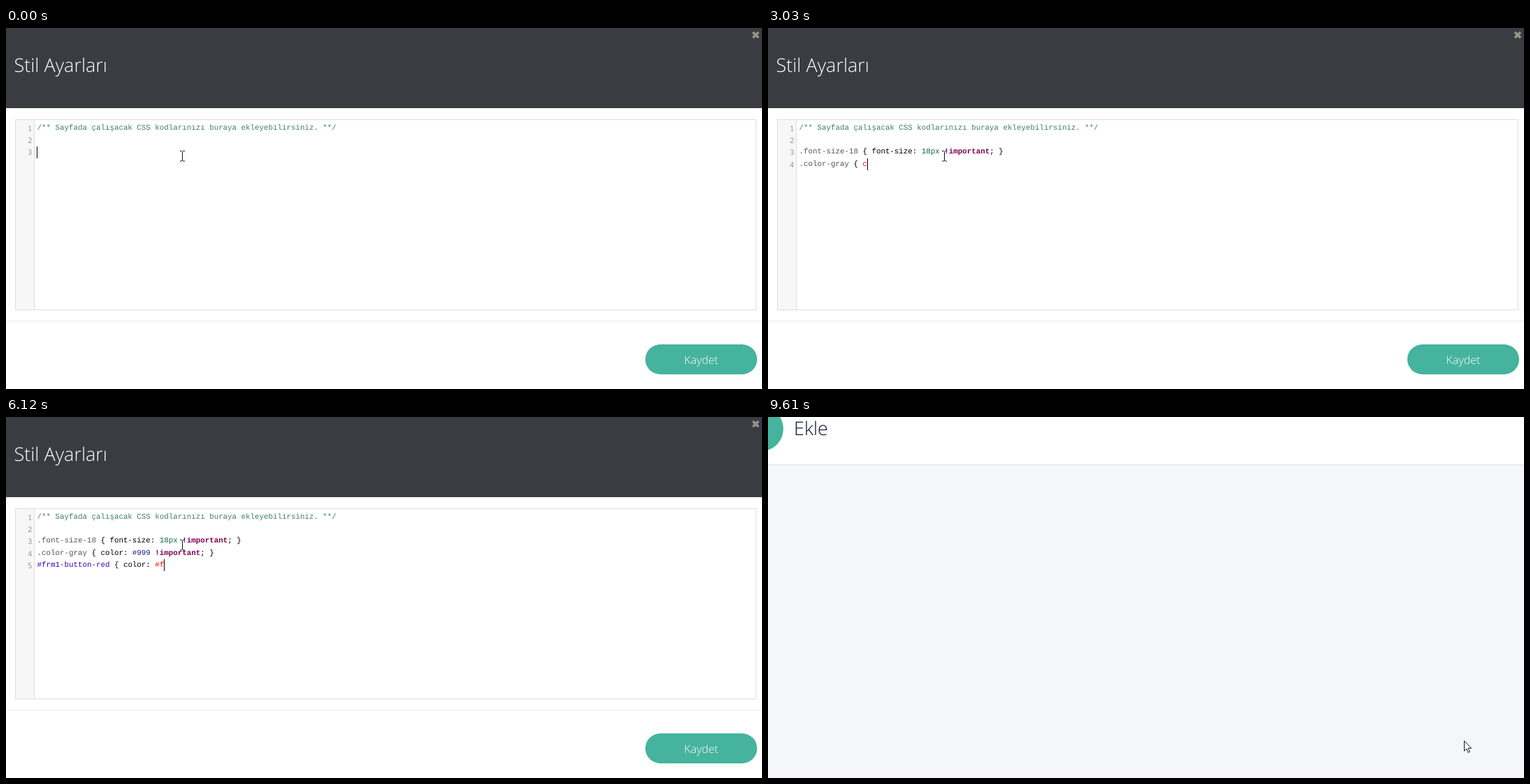
Recreate the animation shown at these times as an HTML page. Size 1082x518 px, loop 9760 ms.

```html
<!DOCTYPE html>
<html lang="tr">
<head>
<meta charset="utf-8">
<title>Stil Ayarları</title>
<style>
  html, body { margin: 0; width: 100%; height: 100%; overflow: hidden; background: #fff; }
  body { position: relative; font-family: "Open Sans", "Noto Sans", sans-serif; font-weight: 300;
    text-rendering: geometricPrecision; }
  #stage { position: absolute; left: 0; top: 0; width: 1082px; height: 518px; overflow: hidden; }
  #stage div, #stage svg, pre, #caret { position: absolute; box-sizing: border-box; margin: 0; white-space: pre; }
  [hidden] { display: none !important; }

  .page { inset: 0; background: #fff; }
  .head { left: 0; top: 0; width: 1082px; height: 115px; background: #3a3c42; }
  .title { font-size: 27px; line-height: 36px; }
  .head .title { left: 11.5px; top: 35px; color: #fff; }
  .editor { left: 13px; top: 131px; width: 1061px; height: 274px; border: 1px solid #ddd; }
  .gutter { left: 0; top: 0; width: 27px; height: 272px; background: #f7f7f7; border-right: 1px solid #ddd; }
  .rule { left: 0; top: 420px; width: 1082px; height: 1px; background: #e9e9e9; }
  #save { left: 915px; top: 453.5px; width: 160px; height: 43.5px; border-radius: 22px;
    color: #fff; font-size: 16px; line-height: 44px; text-align: center; }

  .mono { font: 10.82px/17.25px "Noto Sans Mono", "DejaVu Sans Mono", monospace; top: 135.8px; }
  #nums { left: 14px; width: 23.5px; text-align: right; color: #999; }
  #code { left: 44.6px; color: #000; }
  #caret { width: 1px; height: 17px; background: #000; }
  .comment { color: #3f7f5f; }
  .keyword { color: #7f0055; font-weight: 700; }
  .qualifier { color: #555; }
  .builtin { color: #30a; }
  .atom { color: #219; }
  .number { color: #164; }
  .error { color: #f00; }

  #next { background: #f4f6fa; }
  .bar { left: 0; top: 0; width: 1082px; height: 69px; background: #fff; border-bottom: 1px solid #dcdfe0; }
  .dot { left: -42px; top: -15px; width: 64px; height: 64px; border-radius: 50%; background: #45b39d; }
  .bar .title { left: 37px; top: -2px; color: #0c1733; }
</style>
</head>
<body>
<div id="stage">
  <div class="page" id="form">
    <div class="head">
      <div class="title">Stil Ayarları</div>
      <svg style="left:1067px;top:4px" width="12" height="12">
        <path d="M2 2L10 10M10 2L2 10" stroke="#96948a" stroke-width="3.6"/>
      </svg>
    </div>
    <div class="editor"><div class="gutter"></div></div>
    <pre class="mono" id="nums"></pre>
    <div class="mono" id="code"><pre id="text"></pre><span id="caret"></span></div>
    <div class="rule"></div>
    <div id="save">Kaydet</div>
  </div>
  <div class="page" id="next">
    <div class="bar"><div class="dot"></div><div class="title">Ekle</div></div>
  </div>
  <svg id="beam" width="9" height="16">
    <path d="M1 .5H3.5L4.5 1.5 5.5 .5H8M4.5 1.5V14M1 15H3.5L4.5 14 5.5 15H8" fill="none" stroke="#111"/>
  </svg>
  <svg id="arrow" width="12" height="19">
    <path d="M.5 .7V15.2L3.8 12.1 6.1 17.5 8.4 16.5 6.1 11.3H10.6Z" fill="#fff" stroke="#111"/>
  </svg>
</div>
<script>
  const LOOP = 9760, LEAVE = 9610, BLUR = 9240, LINE = 17.25;
  const HOVER = { start: 8980, length: 300, from: [69, 179, 157], to: [60, 154, 135] };
  const COMMENT = "/** Sayfada çalışacak CSS kodlarınızı buraya ekleyebilirsiniz. **/";
  const TYPED = [
    ".font-size-18 { font-size: 18px !important; }",
    ".color-gray { color: #999 !important; }",
    "#frm1-button-red { color: #f00 !important; border-color: #f00 !important; }"
  ].join("\n");
  const PROPS = ["font", "font-size", "color", "border", "border-color"];

  // [time in ms, characters typed]
  const KEYS = [
    [0, 0], [20, 1], [980, 27], [1000, 28], [1850, 46], [1960, 47], [2010, 48], [2930, 60],
    [3030, 61], [3910, 81], [4010, 82], [4050, 83], [4930, 95], [5030, 96], [5990, 112],
    [6010, 113], [6120, 114], [6920, 129], [6990, 130], [7930, 147], [7980, 148], [8070, 151],
    [8710, 161], [LOOP, 161]
  ];
  // [time in ms, pointer shape, left, top]
  const MOUSE = [
    [0, "beam", 248, 176], [8760, "beam", 520, 262], [8820, "beam", 842, 385],
    [8880, "arrow", 993, 456], [8980, "arrow", 996, 464]
  ];

  const $ = id => document.getElementById(id);
  const span = (kind, s) => kind ? `<span class="${kind}">${s}</span>` : s;

  function typedAt(t) {
    const i = KEYS.findIndex(k => k[0] > t);
    const [t0, n0] = KEYS[i - 1], [t1, n1] = KEYS[i];
    return Math.floor(n0 + (n1 - n0) * (t - t0) / (t1 - t0) + 1e-6);
  }

  function kindOf(token, inBlock) {
    if (token[0] === "!") return "keyword";
    if (token[0] === "#") return !inBlock ? "builtin" : /^#[\da-f]{3}$/.test(token) ? "atom" : "error";
    if (/^\../.test(token)) return "qualifier";
    if (/^\d/.test(token)) return "number";
    if (/^[a-z]/.test(token) && !PROPS.includes(token)) return "error";
    return "";
  }

  function highlight(line) {
    let inBlock = false;
    return line.replace(/!\w*|#[\w-]*|\.[\w-]+|\d\w*|[a-z][\w-]*|[^]/g, token => {
      if (token === "{") inBlock = true;
      return span(kindOf(token, inBlock), token);
    });
  }

  let shown = -1;
  function showCode(count) {
    if (count === shown) return;
    shown = count;
    const lines = TYPED.slice(0, count).split("\n");
    const row = lines.length + 1;
    $("text").innerHTML = [span("comment", COMMENT), "", ...lines.map(highlight)].join("\n");
    $("nums").textContent = Array.from({ length: row + 1 }, (_, i) => i + 1).join("\n");
    $("caret").style.left = `calc(${lines.at(-1).length}ch - .3px)`;
    $("caret").style.top = Math.round(row * LINE) - .3 + "px";
  }

  function showMouse(t) {
    const [, shape, x, y] = MOUSE.findLast(m => m[0] <= t);
    for (const id of ["beam", "arrow"]) $(id).style.display = id === shape ? "" : "none";
    $(shape).style.left = x + "px";
    $(shape).style.top = y + "px";
  }

  function draw(t) {
    showCode(typedAt(t));
    showMouse(t);
    $("caret").hidden = t >= BLUR;
    const p = Math.min(1, Math.max(0, (t - HOVER.start) / HOVER.length));
    $("save").style.background = `rgb(${HOVER.from.map((c, i) => c + (HOVER.to[i] - c) * p)})`;
    $("form").hidden = t < LEAVE ? false : true;
    $("next").hidden = t < LEAVE;
  }

  const start = performance.now();
  function tick() {
    draw((performance.now() - start) % LOOP);
    requestAnimationFrame(tick);
  }
  tick();
</script>
</body>
</html>
```
